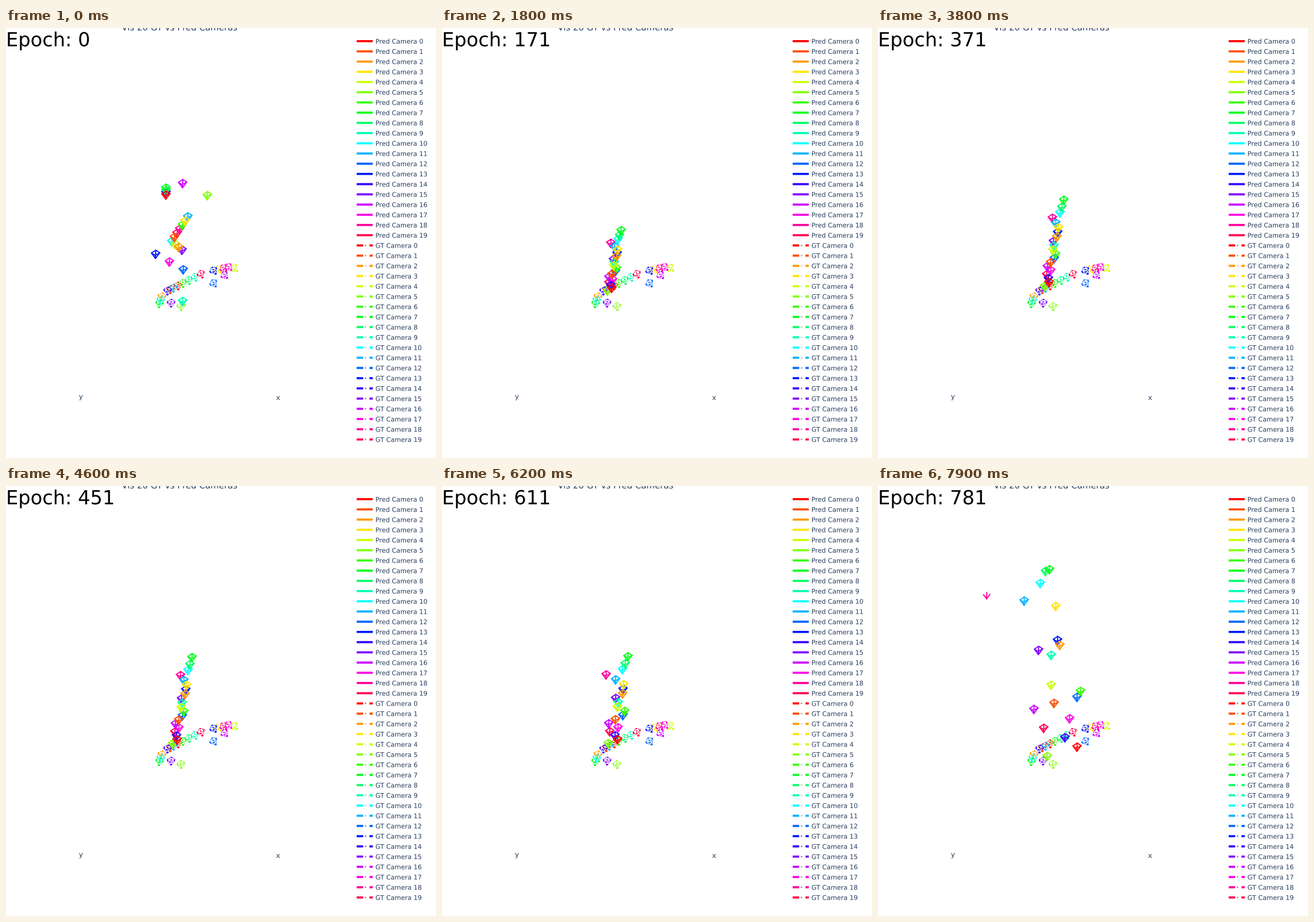
A matplotlib script for the animation above (8000 ms loop, 748 by 748 pixels).

```python
import colorsys

import matplotlib.pyplot as plt
import numpy as np
from matplotlib.animation import FuncAnimation
from matplotlib.collections import LineCollection
from matplotlib.patches import PathPatch
from matplotlib.textpath import TextPath
from matplotlib.transforms import Affine2D

SIZE, DPI = 748, 100
FRAMES, STEP = 80, 100
CAMS = 20
SCALE = 0.935  # page pixels to stage pixels
INK = "#2a3f5f"
COLORS = [colorsys.hsv_to_rgb(i / CAMS, 1, 1) for i in range(CAMS)]
RANK = np.arange(CAMS)

plt.rcParams["font.family"] = "DejaVu Sans"

fig = plt.figure(figsize=(SIZE / DPI, SIZE / DPI), dpi=DPI, facecolor="white")
ax = fig.add_axes([0, 0, 1, 1])
ax.set_xlim(0, SIZE)
ax.set_ylim(SIZE, 0)
ax.axis("off")


def pt(px):
    return px * 72 / DPI


def outline(text, px):
    return TextPath((0, 0), text, size=px * SCALE)


def label(x, y, text, px, color=INK, center=False):
    path = outline(text, px)
    if center:
        x -= path.get_extents().width / 2
    flip = Affine2D().scale(1, -1).translate(x, y)
    return ax.add_patch(PathPatch(path, fc=color, lw=0, snap=False,
                                  transform=flip + ax.transData))


def stroke(x0, x1, y, color, px):
    ax.plot([x0, x1], [y, y], color=color, lw=pt(px),
            solid_capstyle="butt", snap=False)


# Frustum seen from the side: image plane corners, then the apex
LEFT, TOP, RIGHT, FRONT, APEX = np.array(
    [(-7, -1.5), (0.5, -6.5), (7.5, -2), (-0.5, 2.5), (0, 8)])
PLANE = [(LEFT, TOP), (TOP, RIGHT), (RIGHT, FRONT), (FRONT, LEFT)]
EDGES = [(APEX, LEFT), (APEX, TOP), (APEX, RIGHT), (APEX, FRONT)]
FRUSTUM = np.array(PLANE + EDGES)
CUT = 0.8 * np.array(EDGES)  # plane lost beyond the scene's edge
SCENE_LEFT = 200


def turned(shape, deg):
    a = np.radians(deg)
    return shape @ np.array([(np.cos(a), np.sin(a)), (-np.sin(a), np.cos(a))])


def spread_on(order, knots):
    """Place cameras, in order, on a polyline of (rank, x, y) knots."""
    r, x, y = np.transpose(knots)
    pose = np.empty((CAMS, 2))
    pose[order] = np.column_stack([np.interp(RANK, r, x),
                                   np.interp(RANK, r, y)])
    return pose


# Cameras from top to bottom: untrained, then trained with their side drift
FIRST = [16, 7, 8, 14, 0, 5, 11, 3, 6, 18, 19, 1, 10, 4, 2, 15, 13, 17, 12, 9]
LAST = [7, 8, 10, 18, 11, 3, 13, 2, 15, 9, 4, 6, 12, 1, 16, 17, 19, 14, 0, 5]
DRIFT = np.array([-2, -9, -18, -111, -46, 9, 12, 16, -21, 1,
                  1, 52, 46, 6, -29, 33, -12, 25, 46, -6])


def column(top, bottom, drift):
    """Cameras lined up on a leaning axis, each drifting off sideways."""
    y = top + (bottom - top) * (RANK / (CAMS - 1)) ** 0.85
    pose = np.empty((CAMS, 2))
    pose[LAST] = np.column_stack([323 - 0.22 * (y - 300) + drift * DRIFT, y])
    return pose


start = spread_on(FIRST, [
    (0, 307, 270), (1, 278, 278), (4, 278, 290), (5, 350, 291), (6, 316, 328),
    (12, 288, 371), (15, 306, 386), (16, 260, 393), (18, 308, 420),
    (19, 307, 475)])
end = spread_on(LAST, [
    (0, 300, 145), (1, 300, 148), (3, 300, 190), (5, 300, 209), (6, 300, 268),
    (9, 300, 294), (10, 300, 346), (14, 300, 388), (19, 300, 470)])
end[LAST, 0] += DRIFT

STEPS = [0, 18, 30, 53, 71, 79]
poses = np.array([start, column(352, 457, 0.12), column(300, 450, 0.12),
                  column(297, 447, 0.12), column(296, 448, 0.45), end])

# Ground truth: sixteen cameras along an arc, then four below it
truth = spread_on(
    [7, 10, 2, 14, 1, 11, 0, 6, 8, 9, 19, 13, 3, 18, 17, 4, 15, 5, 12, 16],
    [(0, 267, 479), (2, 271, 467), (3, 281, 457), (5, 291, 452),
     (7, 307, 444), (10, 339, 428), (11, 361, 422), (14, 387, 416),
     (15, 397, 418), (16, 287, 478), (17, 304, 484), (18, 361, 444),
     (19, 380, 430)])

for (x, y), color in zip(truth, COLORS):
    shape = turned(FRUSTUM, 0.45 * (285 - x)) + (x, y)
    ax.add_collection(LineCollection(
        shape, colors=[color], linewidths=pt(1.8),
        linestyles=[(0, (1.7, 1, 0.8, 1))]))

pred = []
for i, color in enumerate(COLORS):
    lines = LineCollection([], colors=[color], linewidths=pt(1.9),
                           zorder=4 - i / CAMS, capstyle="round")
    ax.add_collection(lines)
    pred.append(lines)

# Legend
for row in range(2 * CAMS):
    y = 22.9 + 19 * SCALE * row
    kind, i = ("Pred", "GT")[row // CAMS], row % CAMS
    if kind == "Pred":
        stroke(610, 638, y, COLORS[i], 3.7)
    else:
        stroke(610, 621.3, y, COLORS[i], 3.7)
        stroke(624.6, 626.4, y, COLORS[i], 1.9)
        stroke(632.3, 638, y, COLORS[i], 3.7)
    label(642.7, y + 4.3, f"{kind} Camera {i}", 12)

label(301.5, 4.2, "Vis 20 GT vs Pred Cameras", 16, center=True)
label(130, 645, "y", 13, center=True)
label(473, 647, "x", 13, center=True)
epoch = label(0, 31.8, "Epoch: 0", 36, "black")


def draw(n):
    epoch.set_path(outline(f"Epoch: {max(0, 10 * n - 9)}", 36))
    for i, lines in enumerate(pred):
        x, y = (np.interp(n, STEPS, poses[:, i, k]) for k in (0, 1))
        shape = CUT if x < SCENE_LEFT else FRUSTUM
        lines.set_segments(shape + (x, y))
    return [epoch, *pred]


anim = FuncAnimation(fig, draw, frames=FRAMES, interval=STEP,
                     repeat=True, repeat_delay=0, blit=False)
plt.show()
```
